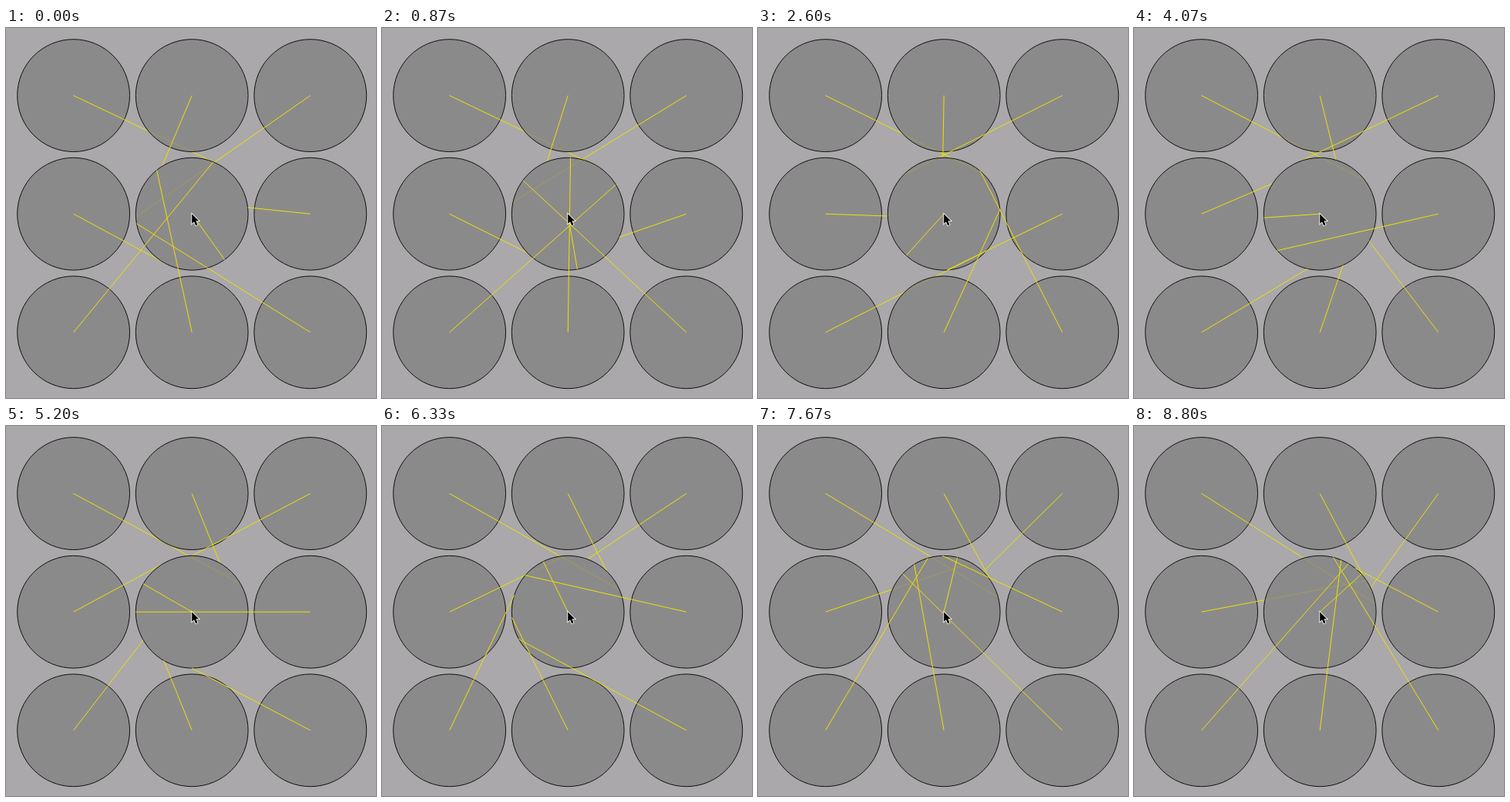
Write an HTML page with a canvas that moves like this. It is 480 px wide and 480 px high and loops after 8870 ms.

```html
<!DOCTYPE html>
<html lang="en">
<head>
<meta charset="utf-8">
<title>Nine rays</title>
<style>
html, body { margin: 0; width: 100%; height: 100%; overflow: hidden; background: #aaa8aa; }
canvas { display: block; width: 480px; height: 480px; }
</style>
</head>
<body>
<canvas id="stage"></canvas>
<script>
const SIZE = 480, LOOP = 8870, STEP = 200 / 3;
const MID = 241.2, GAP = 153.6, RADIUS = 72.9;
const START = -61.1, TURN = 0.3987; // degrees, degrees per step
const ARROW = [[0, 0], [0, 12.6], [2.8, 10], [5, 15], [7.4, 14], [5.2, 9.1], [9, 9.1]];

const canvas = document.getElementById('stage');
const ctx = canvas.getContext('2d');
const ratio = window.devicePixelRatio || 1;
canvas.width = canvas.height = SIZE * ratio;
ctx.scale(ratio, ratio);

function disc(x, y) {
  ctx.beginPath();
  ctx.arc(x, y, RADIUS, 0, Math.PI * 2);
  ctx.fillStyle = 'rgba(127, 126, 127, 0.7)';
  ctx.fill();
  ctx.strokeStyle = '#101010';
  ctx.lineWidth = 1;
  ctx.stroke();
}

function ray(x, y, angle) {
  ctx.beginPath();
  ctx.moveTo(x, y);
  ctx.lineTo(MID + RADIUS * Math.cos(angle), MID + RADIUS * Math.sin(angle));
  ctx.strokeStyle = '#ece200';
  ctx.lineWidth = 1;
  ctx.stroke();
}

function cursor(x, y) {
  ctx.beginPath();
  ARROW.forEach(([dx, dy]) => ctx.lineTo(x + dx, y + dy));
  ctx.closePath();
  ctx.lineJoin = 'miter';
  ctx.strokeStyle = '#fff';
  ctx.lineWidth = 1.6;
  ctx.stroke();
  ctx.fillStyle = '#000';
  ctx.fill();
}

function draw(time) {
  const tick = Math.floor((time % LOOP) / 10) * 10;
  const step = Math.floor((tick + 4) / STEP);
  const base = (START + TURN * step) * Math.PI / 180;

  ctx.fillStyle = '#aaa8aa';
  ctx.fillRect(0, 0, SIZE, SIZE);

  // Each later disc veils the rays beneath it; ray n turns n times as fast.
  for (let i = 0; i < 9; i++) {
    const x = MID + (i % 3 - 1) * GAP;
    const y = MID + (Math.floor(i / 3) - 1) * GAP;
    disc(x, y);
    ray(x, y, base * (i + 1));
  }
  cursor(241.2, 241.2);
}

const origin = performance.now();
function loop() {
  draw(performance.now() - origin);
  requestAnimationFrame(loop);
}
loop();
</script>
</body>
</html>
```
